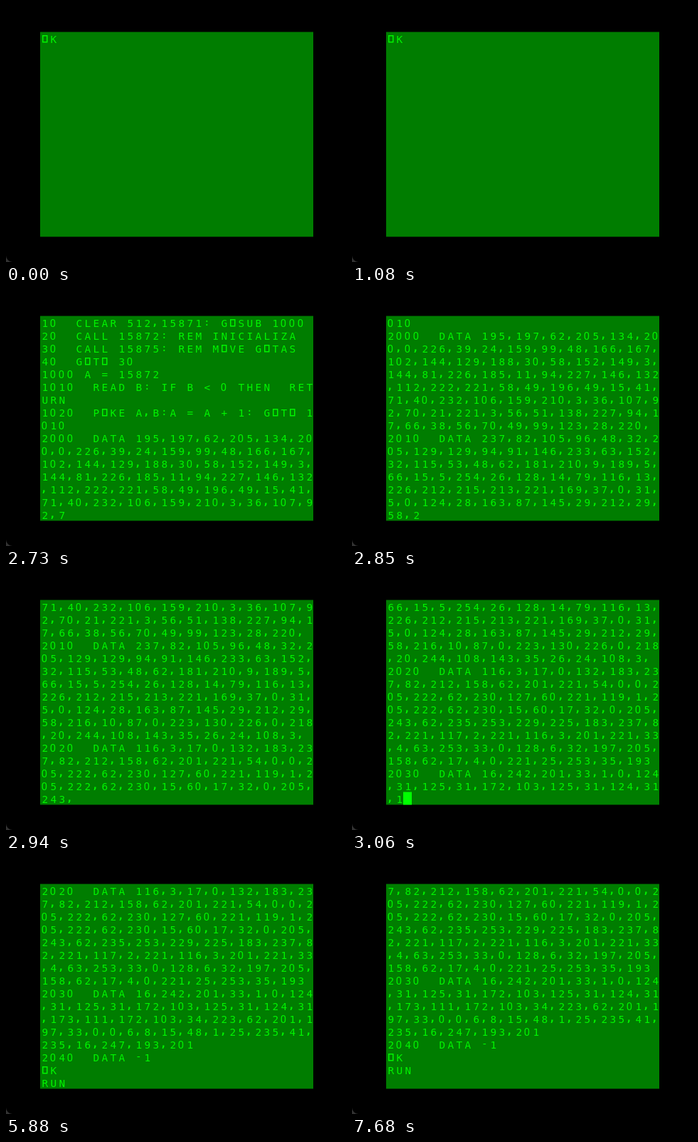
An HTML page with a canvas for the animation above (8 s loop, 478 by 360 pixels).

```html
<!DOCTYPE html>
<html lang="en">
<head>
<meta charset="utf-8">
<title>BASIC listing</title>
<style>
  html, body { margin: 0; width: 100%; height: 100%; overflow: hidden; background: #000; }
  canvas { display: block; }
</style>
</head>
<body>
<canvas id="screen" width="478" height="360"></canvas>
<script>
const LOOP = 8000, TICK = 30, BLINK = 265;
const COLS = 32, ROWS = 16, MAX_LINE = 255;
const CELL_W = 12, CELL_H = 18, LEFT = 48, TOP = 36.5;
const PAPER = '#007d00', INK = '#00f400', CURSOR = '#00ff00';
const MONO = '14.4px "DejaVu Sans Mono", monospace';

let seed = 7;
function random() {
  seed = seed * 16807 % 2147483647;
  return seed / 2147483647;
}

// Fills a DATA line with bytes, small ones more often, up to the longest line BASIC allows
function fillData(line) {
  while (line.length < MAX_LINE) line += ',' + Math.floor(256 * random() ** 1.5);
  return line.slice(0, MAX_LINE);
}

// Byte runs that the machine code repeats
const rnd = '205,222,62,230', ret = '62,201', rotate = '124,31', xor = '172,103';

const listing = `10  CLEAR 512,15871: GOSUB 1000
20  CALL 15872: REM INICIALIZA
30  CALL 15875: REM MOVE GOTAS
40  GOTO 30
1000 A = 15872
1010  READ B: IF B < 0 THEN  RETURN
1020  POKE A,B:A = A + 1: GOTO 1010
${fillData('2000  DATA 195,197,62,205,134,200')}
${fillData('2010  DATA 237,82,105,96,48,32')}
2020  DATA 116,3,17,0,132,183,237,82,212,158,${ret},221,54,0,0,${rnd},127,60,221,119,1,${rnd},15,60,17,32,0,205,243,62,235,253,229,225,183,237,82,221,117,2,221,116,3,201,221,33,4,63,253,33,0,128,6,32,197,205,158,62,17,4,0,221,25,253,35,193
2030  DATA 16,242,201,33,1,0,${rotate},125,31,${xor},125,31,${rotate},173,111,${xor},34,223,${ret},197,33,0,0,6,8,15,48,1,25,235,41,235,16,247,193,201
2040  DATA -1
OK
`;

// Cursor phases: start, lit at the start, time between flips
const phases = [
  [0, false, BLINK], [1800, false, Infinity],
  [2160, true, Infinity], [2550, false, Infinity], [3000, true, Infinity],
  [3128, false, BLINK], [4960, false, Infinity],
  [5084, true, BLINK], [6409, false, 630]
];

// Listing progress: time, characters printed
const progress = [[2520, 0], [2730, 388], [2940, 837], [3060, 1027], [3150, listing.length]];

const ctx = document.getElementById('screen').getContext('2d');

function cursorLit(t) {
  const [start, lit, period] = phases.findLast(phase => phase[0] <= t);
  return lit !== (Math.floor((t - start) / period) % 2 === 1);
}

function printed(t) {
  const i = progress.findIndex(([end]) => t < end);
  if (i < 0) return listing.length;
  const [t0, n0] = progress[i - 1], [t1, n1] = progress[i];
  return Math.round(n0 + (n1 - n0) * (t - t0) / (t1 - t0));
}

function output(t) {
  let text = 'OK\n';
  if (t >= 1920) text += 'LIST';
  if (t >= 2550) text += '\n' + listing.slice(0, printed(t));
  if (t >= 5070) text += 'RUN';
  if (t >= 6150) text += '\n';
  return text;
}

function wrap(text) {
  return text.split('\n').flatMap(line => line.match(/.{1,32}/g) || ['']);
}

function drawChar(ch, x, y) {
  if (ch === ' ') return;
  if (ch === 'O') return ctx.strokeRect(x + 3.75, y + 5.25, 6, 9);
  let dx = 6.75, dy = 15;
  ctx.font = MONO;
  if (ch === '0') {
    ctx.font = '14.7px Roboto, sans-serif';
    dx = 6;
  } else if (ch === ',') {
    ctx.font = 'bold ' + MONO;
    dx = 5.25;
    dy = 13;
  } else if (ch === ':' || ch === '-') {
    dx = 6.25;
    dy = 13.5;
  }
  ctx.fillText(ch, x + dx, y + dy);
}

function drawCorner() {
  ctx.fillStyle = '#333';
  ctx.beginPath();
  ctx.moveTo(0, 351);
  ctx.arcTo(0, 360, 9, 360, 9);
  ctx.lineTo(0, 360);
  ctx.fill();
}

function draw(t) {
  ctx.fillStyle = '#000';
  ctx.fillRect(0, 0, 478, 360);
  drawCorner();
  ctx.fillStyle = PAPER;
  ctx.fillRect(LEFT, TOP, COLS * CELL_W, ROWS * CELL_H);

  ctx.fillStyle = ctx.strokeStyle = INK;
  ctx.lineWidth = 1.5;
  ctx.textAlign = 'center';
  const rows = wrap(output(t)).slice(-ROWS);
  rows.forEach((row, r) => [...row].forEach((ch, c) =>
    drawChar(ch, LEFT + c * CELL_W, TOP + r * CELL_H)));

  if (cursorLit(t)) {
    const r = rows.length - 1, c = Math.min(rows[r].length, COLS - 1);
    ctx.fillStyle = CURSOR;
    ctx.fillRect(LEFT + c * CELL_W, TOP + r * CELL_H, CELL_W, CELL_H);
  }
}

const start = performance.now();
function frame() {
  const t = (performance.now() - start) % LOOP;
  draw(Math.floor(t / TICK) * TICK);
  requestAnimationFrame(frame);
}
frame();
</script>
</body>
</html>
```
